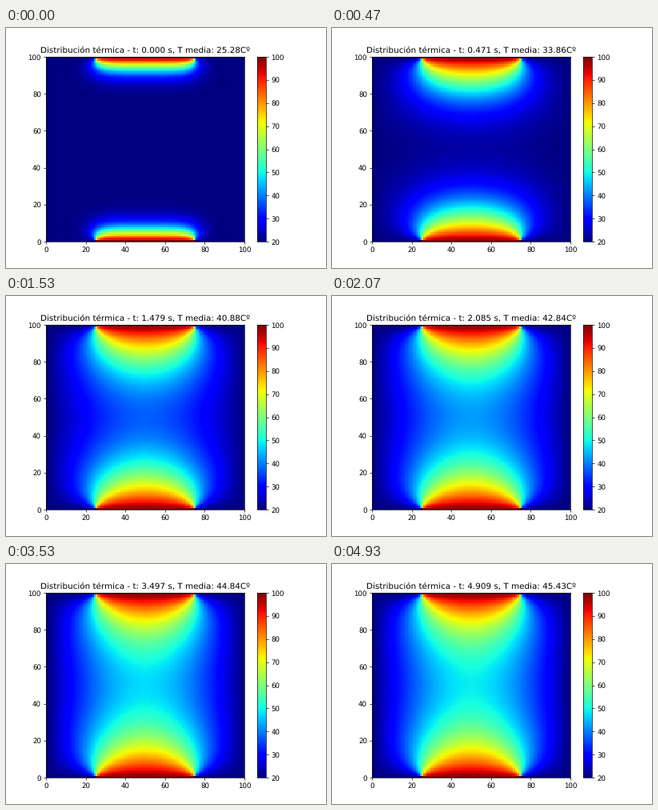
Animation, 400 px wide and 300 px high, one loop 5 s. Source, as a matplotlib script:

```python
import numpy as np
import matplotlib.pyplot as plt
from matplotlib.animation import FuncAnimation

plt.rcParams["font.family"] = "DejaVu Sans"
plt.rcParams["text.hinting"] = "none"

NODES = 100
SIDE = 50.0            # plate side, mm
DIFFUSIVITY = 110.0    # mm^2 / s
T_COLD, T_HOT = 20.0, 100.0
FRAMES = 75
LOOP_MS = 5000
STEPS = 116            # solver steps per frame

dx = SIDE / (NODES - 1)
dt = dx**2 / (4 * DIFFUSIVITY)
ratio = DIFFUSIVITY * dt / dx**2


def advance(u, steps):
    """Explicit finite differences with fixed edge temperatures."""
    u = u.copy()
    for _ in range(steps):
        lap = (u[2:, 1:-1] + u[:-2, 1:-1] + u[1:-1, 2:] + u[1:-1, :-2]
               - 4 * u[1:-1, 1:-1])
        u[1:-1, 1:-1] += ratio * lap
    return u


def solve():
    u = np.full((NODES, NODES), T_COLD)
    u[[0, -1], NODES // 4:3 * NODES // 4] = T_HOT
    states = []
    for _ in range(FRAMES):
        u = advance(u, STEPS)
        states.append(u)
    return states


states = solve()

fig, ax = plt.subplots(figsize=(6.4, 4.8), dpi=62.5)
mesh = ax.pcolormesh(states[0], cmap="jet", vmin=T_COLD, vmax=T_HOT)
fig.colorbar(mesh, ax=ax)
title = ax.set_title("")


def update(i):
    u = states[i]
    time = i * STEPS * dt
    mean = round(float(u.mean()), 2)
    mesh.set_array(u)
    title.set_text(f"Distribución térmica - t: {time:.3f} s, T media: {mean}Cº")
    return mesh, title


anim = FuncAnimation(fig, update, frames=FRAMES, interval=LOOP_MS / FRAMES,
                     repeat=True, repeat_delay=0, blit=False)
plt.show()
```
